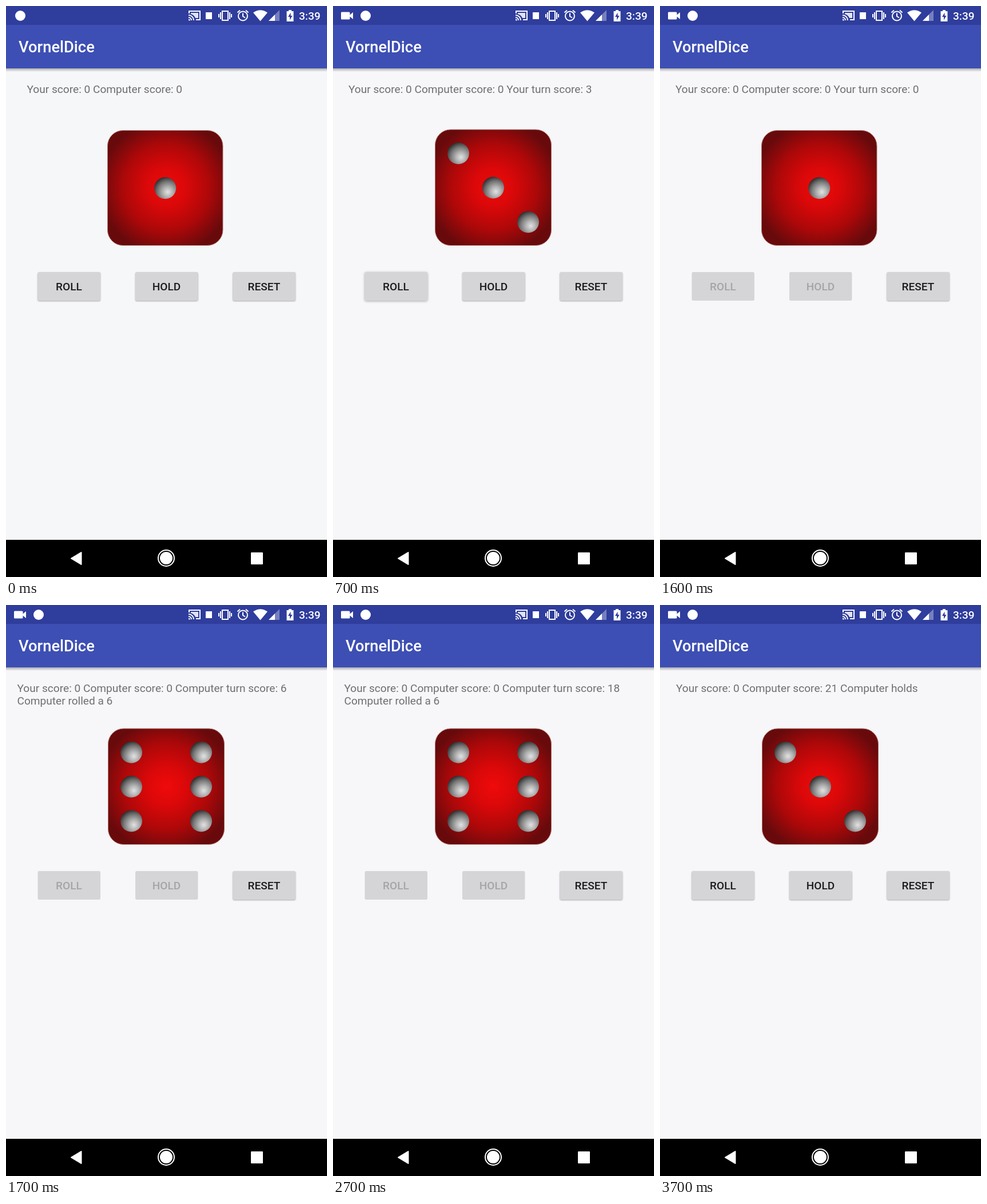
An HTML page for the animation above (3.8 s loop, 561 by 998 pixels).

```html
<!DOCTYPE html>
<html lang="en">
<head>
<meta charset="utf-8">
<title>Dice game</title>
<style>
  html, body { margin: 0; width: 100%; height: 100%; overflow: hidden; }
  svg { display: block; font: 19.1px Roboto, sans-serif; }
  .medium { font-weight: 500; }
  .line { fill: none; stroke: #fff; stroke-width: 2; }
</style>
</head>
<body>
<svg width="561" height="998" viewBox="0 0 561 998">
  <defs>
    <radialGradient id="red" gradientUnits="userSpaceOnUse" cx="280" cy="317" r="116">
      <stop offset="0" stop-color="#f00a0b"/>
      <stop offset=".3" stop-color="#da0809"/>
      <stop offset=".65" stop-color="#ad0809"/>
      <stop offset="1" stop-color="#680a0c"/>
    </radialGradient>
    <radialGradient id="steel" cx=".62" cy=".68" r=".74">
      <stop offset="0" stop-color="#e2e2e2"/>
      <stop offset=".3" stop-color="#b4b4b4"/>
      <stop offset=".65" stop-color="#747474"/>
      <stop offset="1" stop-color="#222"/>
    </radialGradient>
    <linearGradient id="shade" x2="0" y2="1">
      <stop offset="0" stop-opacity=".3"/>
      <stop offset="1" stop-opacity="0"/>
    </linearGradient>
  </defs>

  <rect id="page" width="561" height="998"/>
  <rect y="109" width="561" height="6" fill="url(#shade)"/>
  <rect width="561" height="109" fill="#3d4fb4"/>
  <rect width="561" height="33" fill="#2f3d9c"/>
  <text class="medium" x="22" y="81" font-size="27.3" fill="#fff">VornelDice</text>

  <g id="status" fill="#fff">
    <path id="camera" d="M15 10.500h13q1.500 0 1.500 1.500v3.500l5.500-4.500v12l-5.500-4.500v3.500q0 1.500-1.500 1.500h-13q-1-.5-1-1.500v-10q0-1 1-1.500z"/>
    <circle id="badge" cy="17" r="9"/>
    <!-- cast -->
    <path class="line" d="M320 13v-4h19v15h-7M319 20a5 5 0 0 1 5 5M319 16a9 9 0 0 1 9 9"/>
    <path d="M319 22.500a3 3 0 0 1 3 3h-3zM323 12h13v9h-5a12 12 0 0 0-8-7z" opacity=".85"/>
    <rect x="349" y="11" width="11" height="12"/>
    <!-- vibrate -->
    <path class="line" d="M378 9h10v16h-10zM375 11v12M391 11v12M372 14v6M394 14v6"/>
    <!-- alarm -->
    <circle class="line" cx="414" cy="17.500" r="8"/>
    <path class="line" d="M414 12.500v5.500l4 2.500M404.500 11.500l4.500-4M423.500 11.500l-4.500-4"/>
    <!-- wifi, signal, battery -->
    <path d="M432 11.500q12.500-8.500 25 0L444.500 26.500z"/>
    <path d="M478 7v19h-19z" opacity=".35"/>
    <path d="M470 15v11h-11z"/>
    <path d="M490.500 9h3.500v-2h5v2h3.500v18h-12z"/>
    <path d="M497.500 11.500l-4.500 7.500h3v5.500l4.500-7.500h-3z" fill="#2f3d9c"/>
    <text class="medium" x="512" y="23.500">3:39</text>
  </g>

  <g fill="#6f6e71">
    <text id="score" y="152"></text>
    <text id="roll" x="19.500" y="173.500"></text>
  </g>
  <g id="die"></g>
  <g id="buttons" class="medium" text-anchor="middle"></g>

  <rect y="933" width="561" height="65"/>
  <g fill="#fff" stroke="#fff" stroke-linejoin="round">
    <path d="M114 965.500l17.500-10.500v21z" stroke-width="2"/>
    <circle cx="280" cy="965" r="11" stroke="none"/>
    <circle class="line" cx="280" cy="965" r="14"/>
    <rect x="429" y="956" width="19" height="19" stroke-width="2"/>
  </g>
</svg>

<script>
const LOOP = 3800, PRESS = 500, LOCK = 1200, UNLOCK = 3700;
const $ = id => document.getElementById(id);
const clamp = v => Math.max(0, Math.min(1, v));

const turn = n => `Your score: 0 Computer score: 0 Computer turn score: ${n}`;
const rolled = n => `Computer rolled a ${n}`;

// start time, face, text x, score line, roll line
const scenes = [
  [0, 1, 36.5, 'Your score: 0 Computer score: 0', ''],
  [100, 3, 27, 'Your score: 0 Computer score: 0 Your turn score: 3', ''],
  [LOCK, 1, 27, 'Your score: 0 Computer score: 0 Your turn score: 0', ''],
  [1700, 6, 19.5, turn(6), rolled(6)],
  [2200, 6, 19.5, turn(12), rolled(6)],
  [2700, 6, 19.5, turn(18), rolled(6)],
  [3200, 3, 19.5, turn(21), rolled(3)],
  [UNLOCK, 3, 28, 'Your score: 0 Computer score: 21 Computer holds', '']
];

const pips = {
  1: [[0, 0]],
  3: [[-1, -1], [0, 0], [1, 1]],
  6: [-1, 0, 1].flatMap(y => [[-1, y], [1, y]])
};

function dieMarkup(face) {
  const one = face === 1;
  const x = one ? 177.5 : 178.5, y = one ? 217.5 : 216, size = one ? 201.5 : 203;
  const cx = x + size / 2, cy = y + size / 2;
  return `<rect x="${x}" y="${y}" width="${size}" height="${size - .5}" rx="27"
      fill="url(#red)" stroke="#b07a74"/>` +
    pips[face].map(([i, j]) =>
      `<circle cx="${cx + i * 61}" cy="${cy + j * 60}" r="19" fill="url(#steel)"/>`).join('');
}

$('buttons').innerHTML = ['ROLL', 'HOLD', 'RESET'].map((label, i) => {
  const x = 55.5 + i * 170.5;
  return `<g><rect x="${x}" y="465" width="109.500" height="50" rx="2.700" fill="#d5d4d7"/>
    <text x="${x + 54.5}" y="497">${label}</text></g>`;
}).join('');
const buttons = [...$('buttons').children];

let shown;
function showScene(scene) {
  if (scene === shown) return;
  shown = scene;
  const [start, face, x, score, roll] = scene;
  $('page').setAttribute('fill', start ? '#f7f6f9' : '#f6f7f9');
  $('camera').style.display = start ? '' : 'none';
  $('badge').setAttribute('cx', start ? 57 : 25);
  $('score').setAttribute('x', x);
  $('score').textContent = score;
  $('roll').textContent = roll;
  $('die').innerHTML = dieMarkup(face);
}

function styleButtons(t) {
  const locked = t >= LOCK && t < UNLOCK;
  const lift = t < PRESS ? 0 : 1 - clamp((t - PRESS - 100) / 300);
  buttons.forEach((button, i) => {
    const off = locked && i < 2;
    const depth = off ? 1 - clamp((t - LOCK) / 100) : 1 + (i ? 0 : lift);
    const [box, label] = button.children;
    box.style.filter = depth
      ? `drop-shadow(0 ${1.2 * depth}px ${1.2 * depth}px rgba(0,0,0,.32))` : 'none';
    label.setAttribute('fill', off ? '#a5a4a7' : '#1c1c1d');
  });
}

function draw() {
  const t = performance.now() % LOOP;
  showScene(scenes.findLast(scene => scene[0] <= t));
  styleButtons(t);
  requestAnimationFrame(draw);
}
draw();
</script>
</body>
</html>
```
